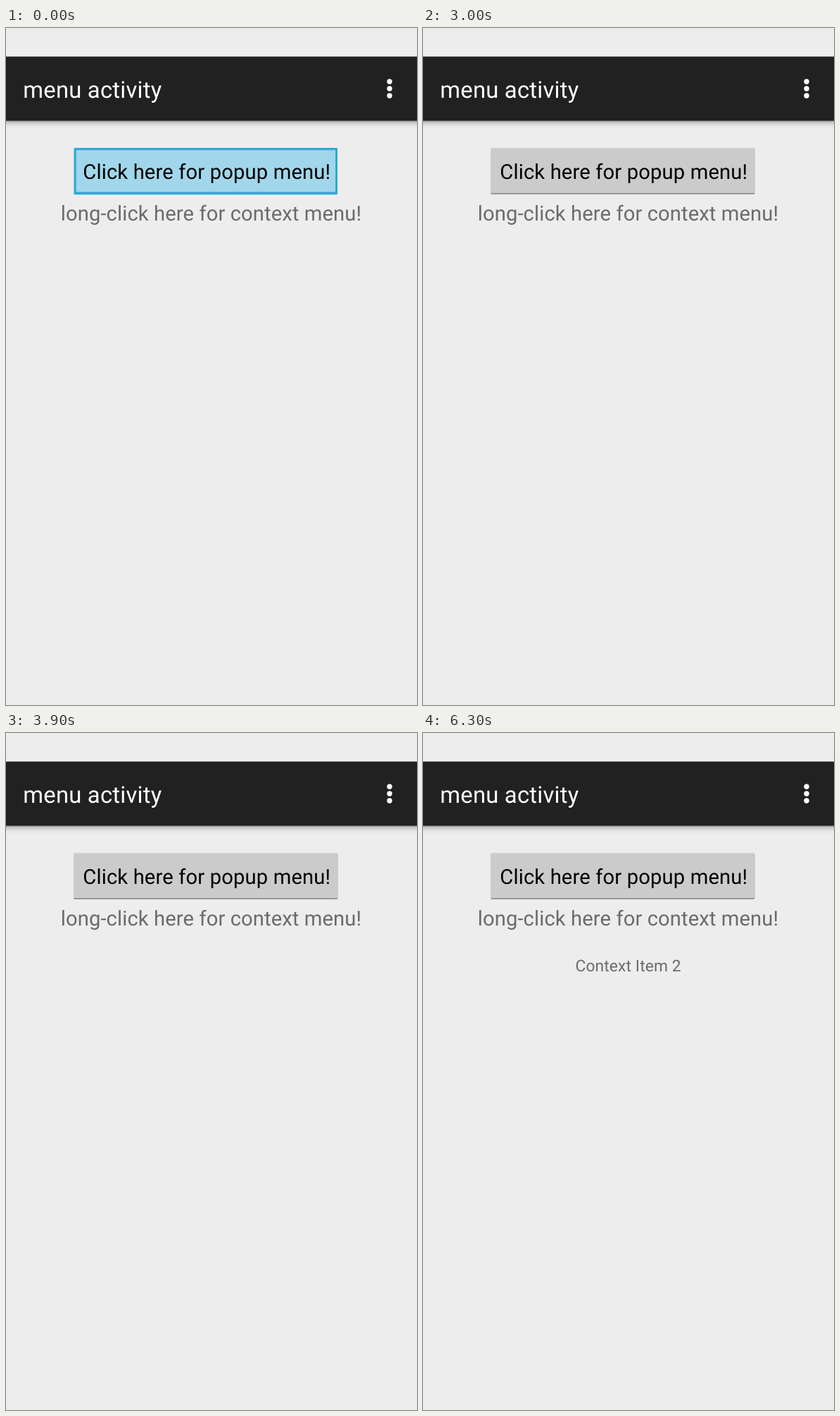
These frames come from a looping animation (584x960 px, 7500 ms). An HTML page:

```html
<!DOCTYPE html>
<html lang="en">
<head>
<meta charset="utf-8">
<title>Menu activity</title>
<style>
html, body { margin: 0; width: 100%; height: 100%; overflow: hidden; background: #ededed; }
svg { display: block; width: 100vw; height: 100vh; }
text { font-family: Roboto, sans-serif; text-rendering: geometricPrecision; }
</style>
</head>
<body>
<svg viewBox="0 0 584 960">
  <defs>
    <linearGradient id="shade" x2="0" y2="1">
      <stop offset="0" stop-opacity=".42"/>
      <stop offset=".25" stop-opacity=".17"/>
      <stop offset=".6" stop-opacity=".05"/>
      <stop offset="1" stop-opacity="0"/>
    </linearGradient>
  </defs>
  <rect width="584" height="960" fill="#ededed"/>

  <rect y="131" width="584" height="12" fill="url(#shade)"/>
  <rect y="40.5" width="584" height="91" fill="#212121"/>
  <text x="24.3" y="99" font-size="32.85" letter-spacing=".2" fill="#fff">menu activity</text>
  <g fill="#fff">
    <circle cx="545" cy="76" r="3.7"/>
    <circle cx="545" cy="86" r="3.7"/>
    <circle cx="545" cy="96" r="3.7"/>
  </g>

  <g id="pressed">
    <rect x="96.5" y="170" width="374.5" height="66.3" rx="1.5" fill="#2eaad3"/>
    <rect x="99.7" y="173.2" width="368.3" height="59.3" fill="#a1d6eb"/>
  </g>
  <g id="normal">
    <rect x="96" y="170.5" width="375.5" height="65.3" rx="1.8" fill="#8e8e8e"/>
    <rect x="96" y="170.5" width="375.5" height="63.6" rx="1.8" fill="#d8d8d8"/>
    <rect x="96" y="171.8" width="375.5" height="62.3" rx="1.2" fill="#cbcbcb"/>
  </g>
  <text x="109.3" y="214" font-size="29.2" letter-spacing=".14">Click here for popup menu!</text>
  <g fill="#6b6b6b">
    <text x="77.8" y="273" font-size="29.2" letter-spacing=".1">long-click here for context menu!</text>
    <text id="choice" x="216.5" y="338" font-size="22.8" letter-spacing=".12">Context Item 2</text>
  </g>
</svg>
<script>
const LOOP = 7500, RELEASE = 3000, CHOOSE = 4500;
const start = performance.now();

function show(id, on) {
  document.getElementById(id).setAttribute("visibility", on ? "visible" : "hidden");
}

function render(t) {
  show("pressed", t < RELEASE);
  show("normal", t >= RELEASE);
  show("choice", t >= CHOOSE);
}

function tick() {
  render((performance.now() - start) % LOOP);
  requestAnimationFrame(tick);
}
tick();
</script>
</body>
</html>
```
